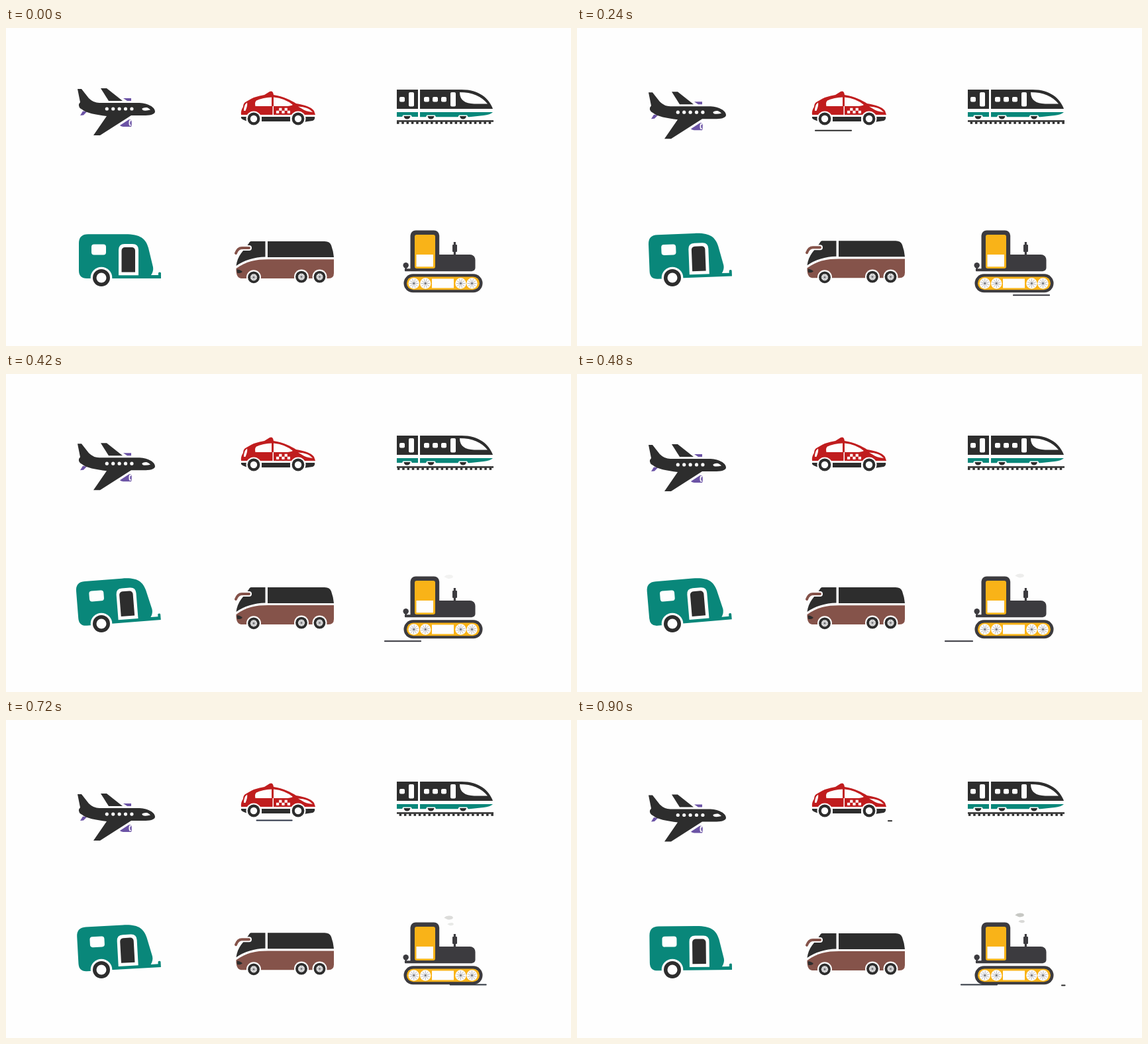
Recreate the animation shown at these times as an HTML page with a canvas. Size 853 by 480 pixels, loop 960 ms.

```html
<!DOCTYPE html>
<html lang="en">
<head>
<meta charset="utf-8">
<title>Transport icons</title>
<style>
html, body { margin: 0; width: 100%; height: 100%; overflow: hidden; background: #fefefe; }
canvas { display: block; width: 853px; height: 480px; }
</style>
</head>
<body>
<canvas id="stage" width="853" height="480"></canvas>
<script>
const ctx = document.getElementById('stage').getContext('2d');
const LOOP = 960, STEP = 60, TAU = Math.PI * 2;
const WHITE = '#fefefe', DARK = '#2d2d2d', RED = '#c01d1e', TEAL = '#09877a',
  BROWN = '#85534a', YELLOW = '#f9b318', PURPLE = '#6b53a5', STEEL = '#3c3b3f';

const cache = {};
function shape(d, color) {
  cache[d] ||= new Path2D(d);
  ctx.fillStyle = color;
  ctx.fill(cache[d]);
}
function outline(d, color, width) {
  cache[d] ||= new Path2D(d);
  ctx.strokeStyle = color;
  ctx.lineWidth = width;
  ctx.lineCap = ctx.lineJoin = 'round';
  ctx.stroke(cache[d]);
}
function box(x, y, w, h, color, r = 0) {
  ctx.fillStyle = color;
  ctx.beginPath();
  ctx.roundRect(x, y, w, h, r);
  ctx.fill();
}
function disc(x, y, r, color, ry = r) {
  ctx.fillStyle = color;
  ctx.beginPath();
  ctx.ellipse(x, y, r, ry, 0, 0, TAU);
  ctx.fill();
}
function group(draw) {
  ctx.save();
  draw();
  ctx.restore();
}

// Linear interpolation through [time, value] pairs.
function track(t, keys) {
  let i = 1;
  while (i < keys.length - 1 && t > keys[i][0]) i++;
  const [t0, a] = keys[i - 1], [t1, b] = keys[i];
  return a + (b - a) * (t - t0) / (t1 - t0);
}

function spokes(x, y, r, angle, count) {
  ctx.strokeStyle = '#8c8c90';
  ctx.lineWidth = 0.6;
  ctx.beginPath();
  for (let i = 0; i < count; i++) {
    const a = angle + i * TAU / count;
    ctx.moveTo(x, y);
    ctx.lineTo(x + r * Math.cos(a), y + r * Math.sin(a));
  }
  ctx.stroke();
  disc(x, y, 1.2, '#66666a');
}

function roadLine(left, right, x, y, width, color) {
  const a = Math.max(left, x), b = Math.min(right, x + width);
  if (b > a) box(a, y - 1, b - a, 2, color, 0.8);
}

function plane(t) {
  const dy = track(t, [[0, 0], [60, 0.4], [120, 1.3], [240, 5.2], [420, 13.2],
    [600, 18.4], [780, 20.9], [900, 21.5]]);
  group(() => {
    ctx.translate(0, dy);
    shape('M112 132 L116 125.5 L122 126.5 L117 131.5 Z', PURPLE);
    shape('M177 106 H189 V110 H183 Z', PURPLE);
    shape('M172 147 L185 138.5 Q188.5 136.5 190 141 Q190.5 146 189 149 H179 Q174 149 172 147 Z', PURPLE);
    disc(187.5, 143.2, 2, WHITE, 4.6);
    disc(188.3, 143.2, 1.1, PURPLE, 3);
    shape('M143 91 H152 L176 110 H155 Z', DARK);
    shape('M108 92 H114 L125 106 Q132 113 141 113 H199 C213 113 225 119 225 126 ' +
      'C225 131 216 132 208 132 H189 L142 162 H132 L152 133 C136 131 120 128 115 123 ' +
      'Q109 120 110 115 L112 112 Z', DARK);
    for (let i = 0; i < 5; i++) disc(152.3 + i * 9.4, 122, 2.6, WHITE);
    shape('M205.5 121.5 Q208 119.5 213 120 Q216 121 218 123.5 Q213 125 208 124.5 Q205 123.5 205.5 121.5 Z', WHITE);
  });
}

function taxi(t) {
  shape('M355 131 Q354 125 358 119 Q358 113 363 111 Q375 103 390 101 L398 96 ' +
    'Q403 94 404 101 C419 103 430 109 438 114 C450 116 461 119 465 125 L467 131 Z', RED);
  shape('M376.5 118 Q375 112 378 109.5 Q388 105 401 104.5 V118 Z', WHITE);
  shape('M404 104.5 Q421 106 433 116 Q429 118 422 118 H404 Z', WHITE);
  shape('M359 125 Q359 116 364 112.5 Q365 117 361.5 125 Z', WHITE);
  shape('M441 118.5 Q457 119 463 127 Q452 126 447 122 Z', WHITE);
  box(402.5, 118, 1.5, 14, WHITE);
  for (let col = 0; col < 5; col++)
    box(408 + col * 4.2, col % 2 ? 120.7 : 124.8, 4.2, 4.1, WHITE);
  shape('M355 134 H366 V141 Q357 139 355 136 Z', DARK);
  box(386, 134, 43, 7, DARK);
  shape('M449 134 H466 Q467 138 463 140 L449 142 Z', DARK);
  for (const x of [374, 441]) {
    disc(x, 137, 11.5, WHITE);
    disc(x, 137, 9.4, DARK);
    disc(x, 137, 5.2, WHITE);
  }
  const left = 310, right = 517;
  roadLine(left, right, 517 - 39.5 * t / STEP, 154.7, 56, DARK);
  roadLine(left, right, 477 - 49.7 * (t - 600) / STEP, 151.5, 55, '#2c3447');
  roadLine(left, right, 469 - 49.7 * (t - 900) / STEP, 152.3, 7, DARK);
}

function train(t) {
  box(590, 93, 32, 29, DARK);
  shape('M625 93 H688 C714 93 729 106 735 122 H625 Z', DARK);
  shape('M685 97 C704 97 718 103 727 114.5 H707 C693 114 685 109 685 97 Z', WHITE);
  for (const x of [594, 631, 644, 657]) box(x, 104, 8, 7.5, WHITE, 2);
  for (const x of [608, 671]) box(x, 97, 8, 21.5, WHITE, 2);
  box(590, 127, 32, 7, TEAL);
  shape('M625 127 H735 Q731 131 721 132 L700 134.2 H625 Z', TEAL);
  for (const x of [605.5, 641.5, 690]) {
    shape(`M${x - 8} 135 L${x - 6} 131.5 H${x + 6} L${x + 8} 135 Z`, WHITE);
    shape(`M${x - 5} 133 H${x + 5} Q${x + 4} 137.5 ${x} 137.5 Q${x - 4} 137.5 ${x - 5} 133 Z`, DARK);
  }
  box(590, 139.3, 146, 2.5, DARK);
  group(() => {
    ctx.beginPath();
    ctx.rect(590, 139, 146, 6);
    ctx.clip();
    const pitch = 7.3, shift = 2 * pitch * t / LOOP;
    for (let x = 590 - shift; x < 736; x += pitch) box(x, 141.5, 3.5, 3.3, DARK);
  });
}

function caravan(t) {
  const tilt = 4.9 * Math.sin(Math.PI * t / 1020) ** 2;
  group(() => {
    ctx.translate(144, 377);
    ctx.rotate(-tilt * Math.PI / 180);
    ctx.translate(-144, -377);
    shape('M110 325 Q110 311.3 124 311.3 H180 C203 311.3 211 318 215 332 L222 361 ' +
      'Q223 367 219 373 H230 V370 Q230 368.5 232 368.5 Q234 368.5 234 370 V378 H122 Q110 378 110 366 Z', TEAL);
    box(129, 326.5, 22, 16, WHITE, 4);
    shape('M170 373.3 V335 Q170 326 179 326 H191 Q200 326 200 335 V373.3 Z', WHITE);
    box(174.5, 331, 20.5, 37.5, DARK, [5, 5, 0, 0]);
  });
  disc(144, 377, 16.3, WHITE);
  disc(144, 377, 13, DARK);
  disc(144, 377, 7.5, WHITE);
}

function bus(t) {
  group(() => {
    ctx.translate(0, -0.8 * Math.sin(TAU * t / LOOP) ** 2);
    shape('M370 322 H391.5 V345.5 Q366 346 347.5 359 Q349 348 355 340 L366 326 Q368 322 370 322 Z', DARK);
    shape('M395 322 H481 Q489 322 491 328 Q494 336 495 346 H395 Z', DARK);
    outline('M347 340 Q350 332 356 332 H367', WHITE, 8);
    outline('M347 340 Q350 332 356 332 H367', BROWN, 4);
    shape('M347.5 363 C363 352 377 349.2 395 349.2 H495 V370 Q495 378 487 378 H355 Q347 377 347.5 363 Z', BROWN);
    shape('M348.5 364.5 Q353 364 357 368 Q354 371 349 369.5 Z', DARK);
  });
  for (const [x, y] of [[374, 376.3], [446, 375.6], [473.5, 375.6]]) {
    disc(x, y, 11, WHITE);
    disc(x, y, 8.9, DARK);
    disc(x, y, 5.1, '#e4e4e4');
    spokes(x, y, 5.1, -TAU * t / LOOP, 8);
  }
}

function puff(x, y, size, alpha) {
  if (alpha <= 0) return;
  group(() => {
    ctx.globalAlpha = alpha;
    ctx.translate(x, y);
    ctx.scale(size, size);
    shape('M-7 0 Q-4 -3 0 -3 Q5 -3.5 6.5 -1 Q7 2 3 2.5 Q0 3.5 -3 2 Z', '#75776f');
  });
}

function tractor(t) {
  box(610.5, 305.5, 43.7, 61.5, STEEL, [8, 8, 0, 0]);
  box(617, 312, 31, 51, YELLOW, 3);
  box(619.5, 342, 25.5, 18.3, WHITE);
  box(652, 342, 56.5, 25, STEEL, [0, 8, 5, 0]);
  box(602, 363.3, 102, 4, STEEL, 1);
  box(675.8, 323, 3.2, 20, STEEL);
  box(674, 327, 7, 11, STEEL, 1);
  disc(603.7, 358.2, 4.2, STEEL);
  box(602.4, 359, 2.6, 8, STEEL);
  box(600.5, 371.3, 119, 28, STEEL, 14);
  box(605, 375.5, 110, 19.7, YELLOW, 9.8);
  box(643, 378.5, 33, 14, WHITE);
  for (const x of [615.8, 633.2, 686.5, 703.5]) {
    disc(x, 385.5, 8.2, WHITE);
    spokes(x, 385.5, 7, -TAU * t / LOOP, 10);
  }

  const left = 555, right = 761;
  const first = track(t, [[0, 762], [120, 710], [240, 658], [420, 571], [600, 484]]);
  const second = track(t, [[480, 800], [600, 735], [780, 637], [900, 579]]);
  roadLine(left, right, first, 403.2, 56, '#34343c');
  roadLine(left, right, second, 399.6, 56, '#2f3640');
  roadLine(left, right, 731 - 30 * (t - 900) / STEP, 400.6, 6.5, DARK);

  const lift = track(t, [[360, 307], [420, 306], [600, 301.7], [780, 297], [900, 294.5]]);
  puff(668.3, lift, 1, track(t, [[360, 0], [420, 0.09], [600, 0.2], [780, 0.27], [900, 0.4]]));
  puff(671.2, lift + 9.7, 0.7, track(t, [[480, 0], [600, 0.11], [780, 0.18], [900, 0.27]]));
}

function render(now) {
  const t = Math.floor(now % LOOP / STEP) * STEP;
  ctx.fillStyle = WHITE;
  ctx.fillRect(0, 0, 853, 480);
  for (const draw of [plane, taxi, train, caravan, bus, tractor]) draw(t);
}

const start = performance.now();
function tick() {
  render(performance.now() - start);
  requestAnimationFrame(tick);
}
tick();
</script>
</body>
</html>
```
